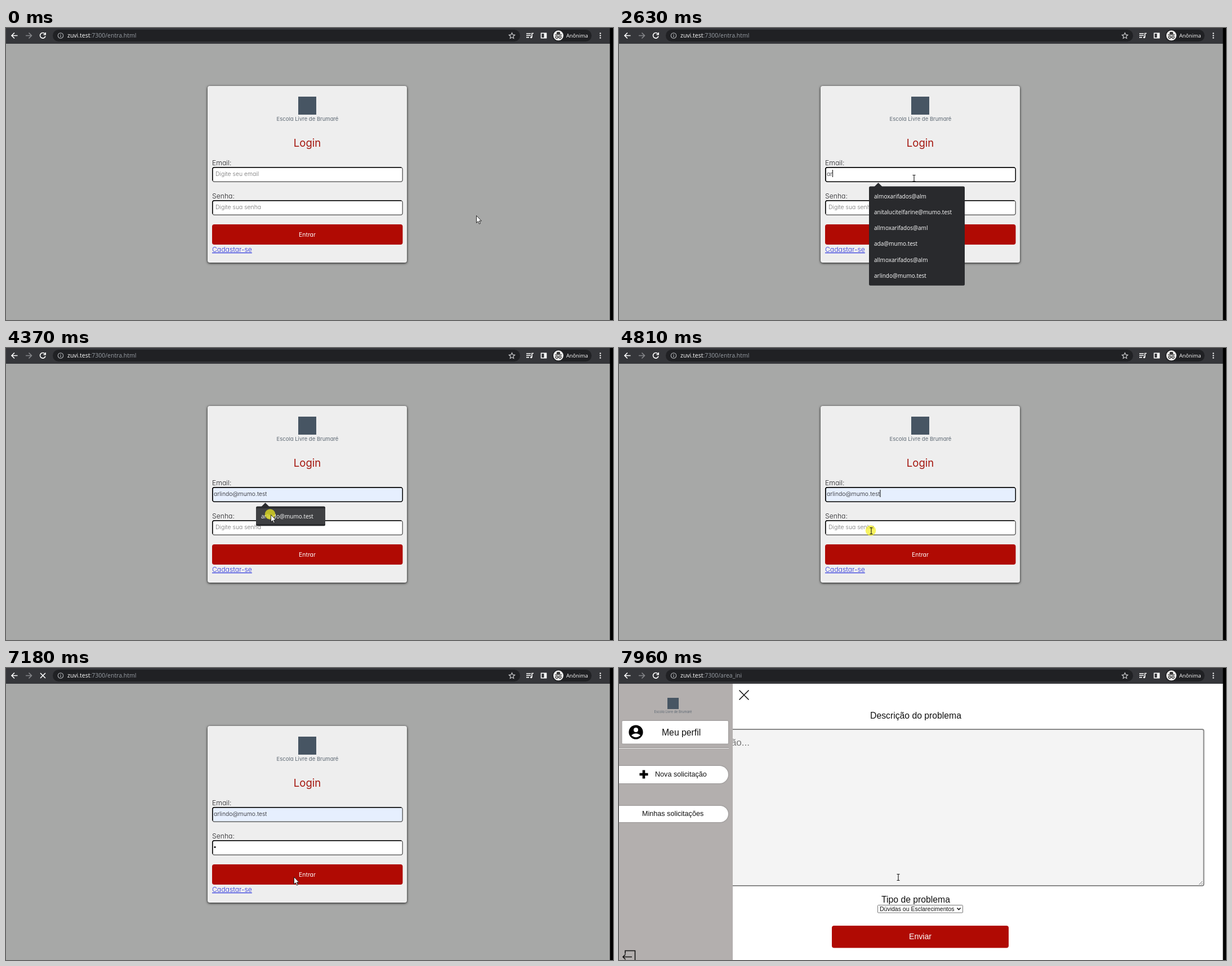
Recreate the animation shown at these times as an HTML page. Size 1078 by 519 pixels, loop 8000 ms.

```html
<!DOCTYPE html>
<html lang="pt-BR">
<head>
<meta charset="utf-8">
<title>Login</title>
<style>
  html, body { margin: 0; width: 100%; height: 100%; overflow: hidden; background: #000; }
  svg { display: block; width: 100vw; height: 100vh; }
  text { white-space: pre; }
  .round { font-family: Inter, sans-serif; font-feature-settings: "cv11"; font-size: 12.2px; font-weight: 300; fill: #222226; }
  .small { font-size: 10.4px; }
  .hint { fill: #757575; }
  .ui { font-family: "Open Sans", sans-serif; font-size: 10.5px; fill: #fff; }
  .arial { font-family: "Liberation Sans", Arial, sans-serif; font-size: 15.75px; fill: #111; }
  .mid { text-anchor: middle; }
  .line { fill: none; stroke: #fff; stroke-width: 1.6; }
  .brand { fill: #475563; }
  .red { fill: #b00a03; }
  .card { filter: drop-shadow(.5px 1px 2px #111); }
  .soft { filter: drop-shadow(0 0 1px #777); }
</style>
</head>
<body>
<svg viewBox="0 0 1078 519" preserveAspectRatio="none">
  <rect width="1073" height="28" fill="#35363a"/>
  <g class="line">
    <path d="M20.500 13.500H10M15 8.500l-5 5 5 5"/>
    <path d="M35 13.500h10.500M40.500 8.500l5 5-5 5" stroke="#85868a"/>
    <path id="reload" d="M69.300 10.600A4.800 4.800 0 1 0 70 14.500M70.200 8v3.700h-3.700"/>
    <path id="stop" d="M61 9l9 9M70 9l-9 9"/>
  </g>
  <rect x="83" y="3" width="830" height="21" rx="10.500" fill="#202124"/>
  <circle cx="97" cy="13.500" r="4.700" class="line" style="stroke:#b5b7ba;stroke-width:1.100"/>
  <path d="M97 12.700v3.500M97 10.500v1.300" stroke="#b5b7ba" stroke-width="1.200"/>
  <text x="109" y="17" class="ui">zuvi.test<tspan id="path" fill="#9aa0a6"></tspan></text>
  <path class="line" style="stroke:#d5d6d8;stroke-width:1.100" d="M898.500 8.500l1.500 3.400 3.700.4-2.800 2.500.8 3.700-3.200-1.900-3.200 1.900.8-3.700-2.800-2.500 3.700-.4z"/>
  <path class="line" d="M924 10h8M924 13.300h8M924 16.600h5M934 16.500V9.500h3"/>
  <circle cx="932.700" cy="16.600" r="1.700" fill="#fff"/>
  <path class="line" d="M950.500 9.200h9v8.600h-9z"/>
  <path d="M955.500 9h4v9h-4z" fill="#fff"/>
  <rect x="970" y="3" width="70" height="21" rx="10.500" fill="#202124"/>
  <circle cx="981" cy="13.300" r="9" fill="#eee"/>
  <path d="M977.500 11l1-4h5l1 4zM975 11.500h12v1.200h-12z" fill="#333"/>
  <path class="line" style="stroke:#333;stroke-width:1.200" d="M976 16.300a2 2 0 1 0 4 0a2 2 0 1 0-4 0M982 16.300a2 2 0 1 0 4 0a2 2 0 1 0-4 0M980 15.800h2"/>
  <text x="995" y="16.800" class="ui" style="font-size:9.200px;font-weight:500">Anônima</text>
  <path d="M1055.500 9.500v.01M1055.500 13.500v.01M1055.500 17.500v.01" stroke="#fff" stroke-width="2.400" stroke-linecap="round"/>

  <g id="login">
    <rect y="28" width="1073" height="491" fill="#a7a8a7"/>
    <rect class="card" x="358" y="103" width="354" height="314" rx="4" fill="#eee"/>
    <rect class="brand" x="519" y="122" width="32" height="32"/>
    <text x="535.500" y="164.500" class="round mid" style="font-size:9.500px;font-weight:400;fill:#5d6873">Escola Livre de Brumaré</text>
    <text x="535" y="211" class="round mid" style="font-size:18.500px;font-weight:400;fill:#a3130b">Login</text>
    <text x="366" y="244" class="round">Email:</text>
    <text x="366" y="303" class="round">Senha:</text>
    <g id="fields"></g>
    <text x="372" y="263" class="round small hint" id="emailHint">Digite seu email</text>
    <text x="372" y="322" class="round small hint" id="passHint">Digite sua senha</text>
    <text x="369" y="263" class="round small" id="email"></text>
    <circle id="dot" cx="371" cy="318.300" r="1.600" fill="#111"/>
    <rect id="caret" width="1" height="13"/>
    <rect class="red" x="366" y="349" width="338.500" height="36" rx="4"/>
    <text x="535" y="371" class="round small mid" style="fill:#fff;font-weight:400">Entrar</text>
    <text x="366" y="398" class="round" style="fill:#2a33dd;text-decoration:underline">Cadastar-se</text>
    <g id="list">
      <path d="M453.500 282l7-7 7 7z" fill="#292a2d"/>
      <rect id="panel" x="444" y="281.500" rx="2.500" fill="#292a2d"/>
      <rect id="hover" x="444" y="285" width="123" height="28" fill="#3f4043"/>
      <g id="options"></g>
    </g>
  </g>

  <g id="home">
    <rect y="28" width="1073" height="491" fill="#fff"/>
    <text x="527" y="90" class="arial mid">Descrição do problema</text>
    <rect x="100" y="109" width="938.500" height="278" rx="3" fill="#f4f4f4" stroke="#888" stroke-width="2"/>
    <path d="M1030 385l6-6M1033.500 385l2.500-2.500" stroke="#777"/>
    <text x="232" y="138" class="arial" text-anchor="end" style="font-size:17px;fill:#777">ão...</text>
    <text x="527" y="417" class="arial mid">Tipo de problema</text>
    <rect x="459.500" y="421.500" width="151" height="13.500" rx="1" fill="#fff" stroke="#767676"/>
    <text x="463" y="432" class="arial" style="font-size:10.500px">Dúvidas ou Esclarecimentos</text>
    <path class="line" style="stroke:#111" d="M600.500 426.500l3 3 3-3"/>
    <rect class="red" x="378" y="458" width="314" height="39.500" rx="4"/>
    <text x="535" y="482" class="arial mid" style="font-size:14.100px;fill:#fff">Enviar</text>
    <rect y="28" width="202" height="491" fill="#b3afae"/>
    <path class="line" style="stroke:#111" d="M213.500 39.500l17 17M230.500 39.500l-17 17"/>
    <rect class="brand" x="86" y="53" width="20" height="20"/>
    <text x="96" y="79.500" class="round mid" style="font-size:5.800px;font-weight:400;fill:#5d6873">Escola Livre de Brumaré</text>
    <rect class="soft" x="5.500" y="94" width="188.500" height="40.500" rx="1.500" fill="#fff"/>
    <circle cx="30" cy="114" r="12.600"/>
    <circle cx="30" cy="110" r="4" fill="#fff"/>
    <path d="M22 119.500q8-6.500 16 0q-8 7.500-16 0z" fill="#fff"/>
    <text x="76" y="120" class="arial">Meu perfil</text>
    <path d="M0 141.500h195" stroke="#8c8988"/>
    <path d="M0 142.500h195" stroke="#eee"/>
    <g class="soft" fill="#fff">
      <rect x="-30" y="174" width="224" height="31" rx="15.500"/>
      <rect x="-30" y="245" width="224" height="29" rx="14.500"/>
    </g>
    <path d="M44 181.500v15M36.500 189h15" stroke="#000" stroke-width="4.600"/>
    <text x="64" y="193" class="arial" style="font-size:12.600px">Nova solicitação</text>
    <text x="41" y="263" class="arial" style="font-size:12.600px">Minhas solicitações</text>
    <path class="line" style="stroke:#111" d="M11 508v-5.500h17.500V519M23 513.500H7M11.500 509l-4.500 4.500 4.500 4.500"/>
  </g>

  <rect x="1072.500" width="5.500" height="519"/>
  <circle id="click" r="9.300" fill="#f5ef1e" fill-opacity=".7"/>
  <path id="arrow" d="M.5.500v12.800l2.900-2.700 2 4.600 2-.9-2-4.400h4z" fill="#fff" stroke="#111" stroke-width=".9"/>
  <path id="beam" d="M-2.500-5.500h2l.5.500.5-.5h2M0-5V5M-2.500 5.500h2l.5-.5.500.5h2" fill="none" stroke="#111" stroke-width="1.100"/>
</svg>
<script>
const LOOP = 8000;
const $ = id => document.getElementById(id);
const show = (id, on) => $(id).style.display = on ? "" : "none";
const set = (id, attrs) => { for (const k in attrs) $(id).setAttribute(k, attrs[k]); };

const address = "arlindo@mumo.test";
const accounts = ["almoxarifados@alm", "anitalucitelfarine@mumo.test", "allmoxarifados@aml",
  "ada@mumo.test", "allmoxarifados@alm", address];

const FIELD_Y = { email: 247, pass: 306 };
$("fields").innerHTML = Object.entries(FIELD_Y).map(([name, y]) => `
  <rect id="${name}Box" x="366.750" y="${y + .75}" width="337.500" height="25.500" rx="3.500" stroke-width="1.500"/>
  <path d="M366.750 ${y + 24}V${y + 4.250}q0-3.500 3.500-3.500H702" fill="none" stroke="#000" stroke-width="1.500"/>`).join("");

// Each step changes only the listed parts of the state.
const steps = [
  [0, { x: 835, y: 333, email: "", rows: 0 }],
  [880, { x: 770, y: 320 }],
  [1040, { x: 650, y: 297 }],
  [1200, { x: 560, y: 277 }],
  [1370, { x: 524, y: 267 }],
  [1530, { click: true }],
  [1690, { click: false, focus: "email", caret: true, rows: 6 }],
  [2160, { caret: false }],
  [2460, { email: address.slice(0, 1), caret: true }],
  [2630, { email: address.slice(0, 2) }],
  [2790, { rows: 1 }],
  [2940, { email: address.slice(0, 3) }],
  [3260, { email: address.slice(0, 4) }],
  [3720, { x: 455, y: 268, caret: false }],
  [3890, { x: 382, y: 277 }],
  [4050, { x: 470, y: 296, email: address, filled: true, hover: true }],
  [4370, { click: true }],
  [4530, { click: false, rows: 0, caret: true }],
  [4690, { x: 448, y: 325 }],
  [4810, { click: true }],
  [5010, { click: false, focus: "pass" }],
  [5440, { caret: false }],
  [5590, { caret: true, typed: true }],
  [5920, { x: 460, y: 338 }],
  [6070, { x: 500, y: 362, caret: false }],
  [6220, { x: 511, y: 371 }],
  [6700, { caret: true }],
  [7000, { click: true }],
  [7180, { click: false, focus: null, loading: true }],
  [7480, { home: true, loading: false, x: 513, y: 372 }],
  [7960, { x: 496 }],
];

function stateAt(t) {
  return Object.assign({}, ...steps.filter(([at]) => at <= t).map(([, change]) => change));
}

function drawList(s) {
  show("list", s.rows);
  const items = s.rows === 1 ? [address] : accounts;
  set("panel", { width: s.rows === 1 ? 123 : 170, height: 6.500 + 28.300 * items.length });
  show("hover", s.hover);
  $("options").innerHTML = items.map((name, i) =>
    `<text x="453" y="${302.500 + 28.300 * i}" class="ui" style="font-size:10px;font-weight:500">${name}</text>`).join("");
}

function draw(s) {
  show("login", !s.home);
  show("home", s.home);
  show("reload", !s.loading);
  show("stop", s.loading);
  $("path").textContent = s.home ? ":7300/area_ini" : ":7300/entra.html";

  for (const name in FIELD_Y)
    set(name + "Box", {
      fill: name === "email" && s.filled ? "#e6effe" : "#fff",
      stroke: s.focus === name ? "#000" : "#666",
    });
  $("email").textContent = s.email;
  show("emailHint", !s.email);
  show("passHint", !s.typed);
  show("dot", s.typed);

  show("caret", s.focus && s.caret);
  const typedWidth = s.focus === "pass" ? (s.typed ? 3.500 : 0)
    : s.email && !s.home ? $("email").getComputedTextLength() : 0;
  set("caret", { x: 369 + typedWidth, y: s.focus === "pass" ? 311 : 252 });
  drawList(s);

  const overField = s.x > 366 && s.x < 705 &&
    Object.values(FIELD_Y).some(y => s.y > y && s.y < y + 27);
  const beam = s.home || overField;
  show("beam", beam);
  show("arrow", !beam);
  const transform = `translate(${s.x} ${s.y})`;
  set("beam", { transform });
  set("arrow", { transform });
  set("click", { cx: s.x - 1, cy: s.y - .5 });
  show("click", s.click);
}

function frame() {
  draw(stateAt(performance.now() % LOOP));
  requestAnimationFrame(frame);
}
frame();
</script>
</body>
</html>
```
